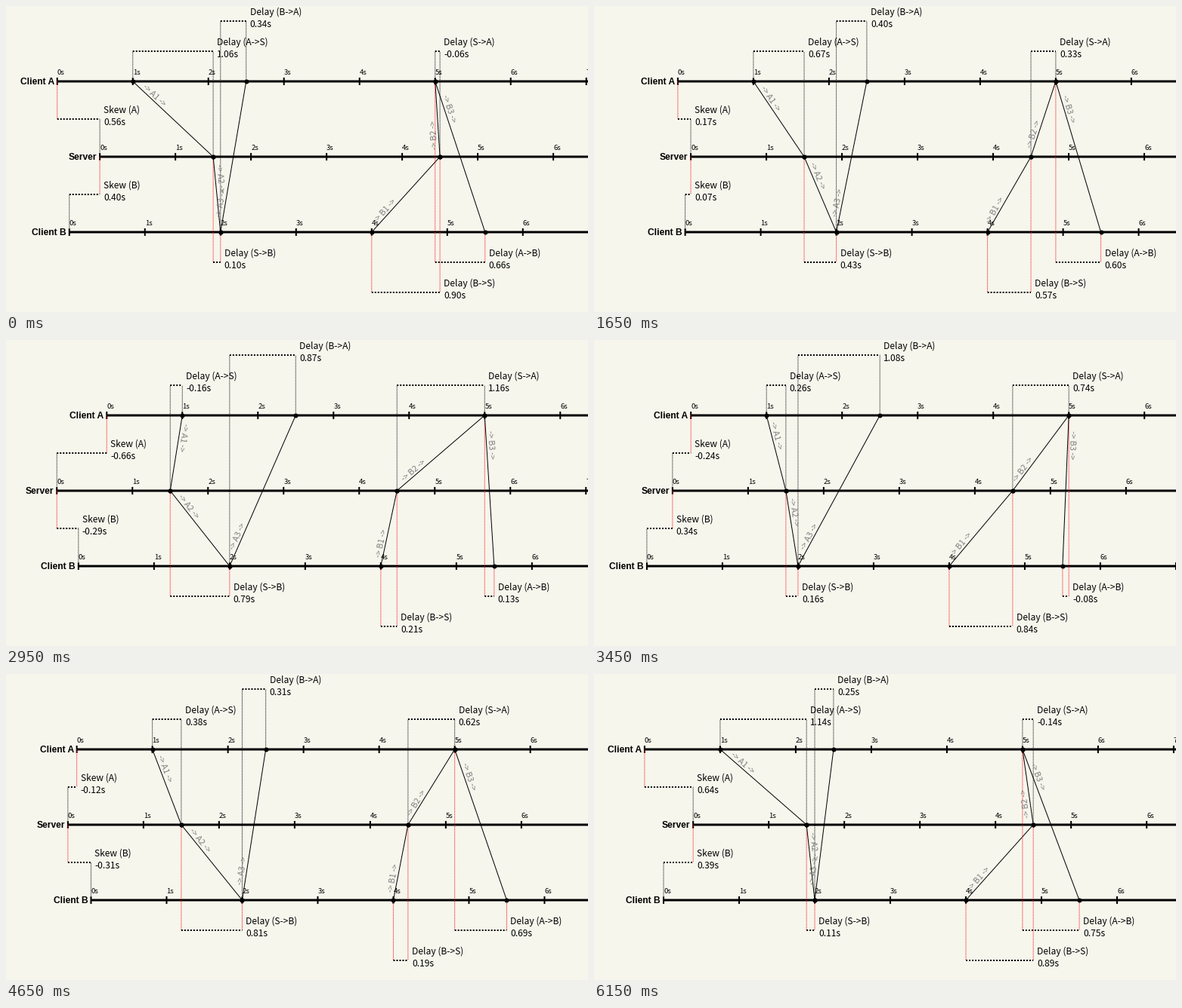
Recreate the animation shown at these times as a matplotlib script. Size 770 px wide and 406 px high, loop 6200 ms.

```python
import numpy as np
import matplotlib.pyplot as plt
from matplotlib.animation import FuncAnimation
from matplotlib.lines import Line2D

W, H, DPI = 770, 406, 64
PT = 72 / DPI                 # points per pixel
FRAMES, STEP = 124, 50
SEC = 100                     # pixels per second on each time axis
SWING = SEC / 3
PHASE = 0.254
BODY, BOLD = "Noto Sans CJK JP", "Liberation Sans"
DOTTED = (0, (1, 1))

plt.rcParams["path.snap"] = False
plt.rcParams["toolbar"] = "None"

ROWS = {"A": 100, "S": 200, "B": 300}
NAMES = {"A": "Client A", "S": "Server", "B": "Client B"}

# label, sender, send time, receiver, receive time, bracket height
MESSAGES = [
    ("A1", "A", 1.0, "S", 1.5, 60),
    ("A2", "S", 1.5, "B", 2.0, 340),
    ("A3", "B", 2.0, "A", 2.5, 20),
    ("B1", "B", 4.0, "S", 4.5, 380),
    ("B2", "S", 4.5, "A", 5.0, 60),
    ("B3", "A", 5.0, "B", 5.5, 340),
]

fig = plt.figure(figsize=(W / DPI, H / DPI), dpi=DPI, facecolor="#f6f6ed")
ax = fig.add_axes([0, 0, 1, 1])
ax.set_xlim(0, W)
ax.set_ylim(H, 0)
ax.axis("off")


def line(x0, y0, x1, y1, width=1, color="black", style="-"):
    ax.add_line(Line2D([x0, x1], [y0, y1], lw=width * PT, color=color,
                       ls=style, solid_capstyle="butt", dash_capstyle="butt"))


def text(x, y, s, size=12, font=BODY, **kw):
    kw.setdefault("va", "baseline")
    ax.text(x, y, s, fontsize=size * PT, family=font, **kw)


def dot(x, y):
    ax.add_line(Line2D([x], [y], marker="o", ms=6 * PT, mew=0, color="black"))


def time_axis(key, x):
    y = ROWS[key]
    line(x, y, W + 5, y, 3)
    text(x - 4, y + 4, NAMES[key], font=BOLD, weight="bold", ha="right")
    for s in range(int((W - x) // SEC) + 1):
        tx = x + s * SEC
        line(tx, y - 5, tx, y + 5, 2)
        text(tx, y - 9, f"{s}s", 9.5)


def bracket(title, value, ends, y):
    """Dotted measure at height y between two (x, row height) points."""
    for x, row in ends:
        line(x, row, x, y, color="red" if y > row else "black", style=DOTTED)
    left, right = sorted(x for x, _ in ends)
    line(left, y, right, y, 2, style=DOTTED)
    text(right + 5, y - 8, title)
    text(right + 5, y + 8, f"{value:.2f}s")


def message(label, p, q):
    line(*p, *q)
    dx, dy = q[0] - p[0], q[1] - p[1]
    n = np.hypot(dx, dy)
    lift = 2.5
    text(p[0] + 0.1 * dx + lift * dy / n, p[1] + 0.1 * dy - lift * dx / n,
         f"-> {label} ->", 11, color="#808080", ha="left",
         rotation=np.degrees(np.arctan2(-dy, dx)), rotation_mode="anchor")
    dot(*p)
    dot(*q)


def draw(i):
    for artist in [*ax.lines, *ax.texts]:
        artist.remove()

    t = i * STEP / 1000 + PHASE
    start = {
        "A": SEC - SWING * np.cos(t),
        "S": SEC + SWING * np.cos(3 * t),
        "B": SEC - SWING * np.sin(2 * t),
    }

    for key, x in start.items():
        time_axis(key, x)

    for key, y in (("A", 150), ("B", 250)):
        ends = [(start[key], ROWS[key]), (start["S"], ROWS["S"])]
        bracket(f"Skew ({key})", (start["S"] - start[key]) / SEC, ends, y)

    for label, src, sent, dst, got, y in MESSAGES:
        p = (start[src] + sent * SEC, ROWS[src])
        q = (start[dst] + got * SEC, ROWS[dst])
        bracket(f"Delay ({src}->{dst})", (q[0] - p[0]) / SEC, [p, q], y)
        message(label, p, q)
    return []


anim = FuncAnimation(fig, draw, frames=FRAMES, init_func=lambda: [],
                     interval=STEP, repeat=True, repeat_delay=0)
plt.show()
```
